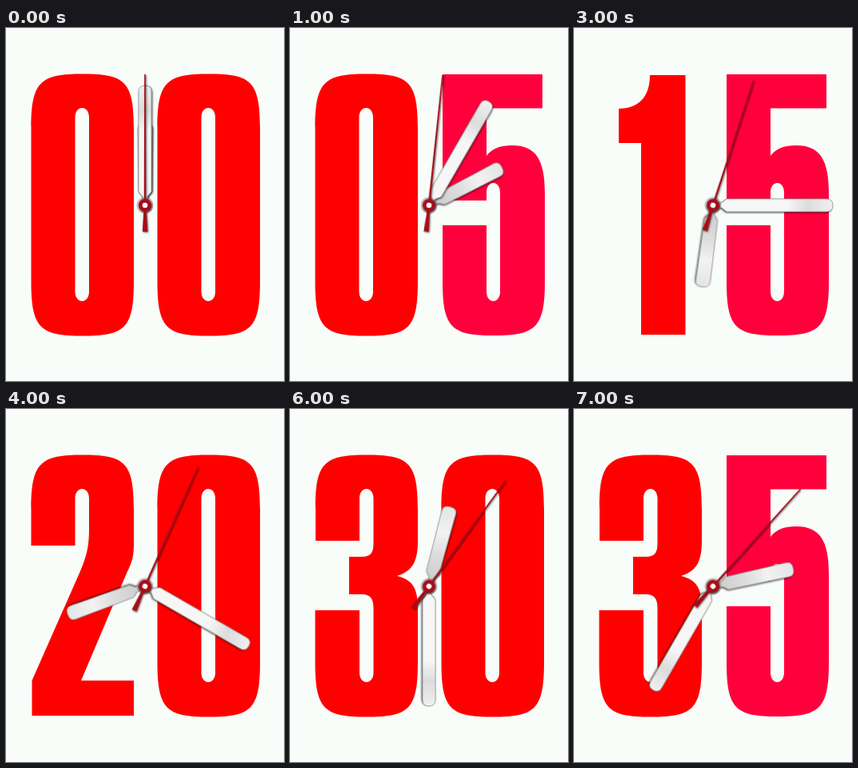
An HTML page that plays this animation: 348 px wide and 442 px high, repeating every 8 s.

```html
<!DOCTYPE html>
<html>
<head>
<meta charset="utf-8">
<style>
html, body { margin: 0; width: 100%; height: 100%; overflow: hidden; background: #f9fdf9; }
svg { display: block; width: 100%; height: 100%; }
.hand { filter: drop-shadow(1px 1px 1px #000a); }
.bar { stroke: #999; stroke-width: .8; }
</style>
</head>
<body>
<svg viewBox="0 0 348 442">
  <defs>
    <linearGradient id="long" x1="0" y1="0" x2="0" y2="1">
      <stop offset="0" stop-color="#f0f0f0"/>
      <stop offset=".22" stop-color="#dcdcdc"/>
      <stop offset=".4" stop-color="#f6f6f6"/>
      <stop offset="1" stop-color="#f6f6f6"/>
    </linearGradient>
    <linearGradient id="short" x1="0" y1="0" x2="0" y2="1">
      <stop offset="0" stop-color="#e4e4e4"/>
      <stop offset=".35" stop-color="#f2f2f2"/>
      <stop offset=".6" stop-color="#e0e0e0"/>
      <stop offset="1" stop-color="#cdcdcd"/>
    </linearGradient>
  </defs>
  <path id="tens" fill="#f00" fill-rule="evenodd"/>
  <path id="units" fill-rule="evenodd"/>
  <g transform="translate(174 222)">
    <path id="hour" class="hand bar" fill="url(#short)" d="M-3 -8L-3 -12L-8 -18L-9 -96Q-9 -103 0 -103T9 -96L8 -18L3 -12V-8Z"/>
    <path id="minute" class="hand bar" fill="url(#long)" d="M-3 -8L-3 -11L-8 -17V-142Q-8 -150 0 -150T8 -142V-17L3 -11V-8Z"/>
    <circle r="10.5" fill="#777" opacity=".45"/>
    <g id="second" class="hand" fill="#a80c18">
      <path d="M-.8 -164H.8L1.2 0L3.2 33H-3.2L-1.2 0Z"/>
      <circle r="8"/>
      <circle r="3.3" fill="#fff"/>
    </g>
  </g>
</svg>
<script>
const $ = id => document.getElementById(id);
const crown = 'C31.5 66 44 57.5 96 57.5S160 66 160 125';
const base = 'V318C160 377 148 385.5 96 385.5S31.5 377 31.5 318';
const digits = {
  0: `M31.5 125${crown}${base}ZM86.5 112V330C86.5 346 104 346 104 330V112C104 96 86.5 96 86.5 112Z`,
  1: 'M95 59H139.5V384H84V144H56V101C82 101 95 85 95 59Z',
  2: `M31.5 171V125${crown}V170C160 188 156 195 150 208L94 340H160V384H32.5V340L93 203
      C101 184 104 172 104 150V112C104 96 86.5 96 86.5 112V171Z`,
  3: `M32 165V125${crown}V165C160 190 154 203 134 209C154 214 160 225 160 250${base}V252
      H87V330C87 346 104.5 346 104.5 330V250C104.5 238 101 232 90 232H74V185H90
      C101 185 104.5 180 104.5 168V112C104.5 96 87 96 87 112V165Z`,
  5: `M33 58H158V100.5H88V160C96 150 106 147 120 147C150 147 161 165 161 207V318
      C161 376 149 385 97 385S33 376 33 318V247H88V330C88 346 105 346 105 330V206
      C105 190 88 190 88 206V216H33Z`
};
const turn = (id, angle) => $(id).setAttribute('transform', `rotate(${angle})`);

$('units').setAttribute('transform', 'translate(158)');

// Every second the clock jumps on by two hours, five minutes and one second.
function draw(now) {
  const step = Math.floor(now / 1000) % 8;
  const minutes = step * 5;
  $('tens').setAttribute('d', digits[Math.floor(minutes / 10)]);
  $('units').setAttribute('d', digits[minutes % 10]);
  $('units').setAttribute('fill', step % 2 ? '#ff003c' : '#f00');
  turn('hour', step * 62.5);
  turn('minute', step * 30);
  turn('second', step * 6);
}

let start;
function tick(now) {
  start ??= now;
  draw(now - start);
  requestAnimationFrame(tick);
}
draw(0);
requestAnimationFrame(tick);
</script>
</body>
</html>
```
